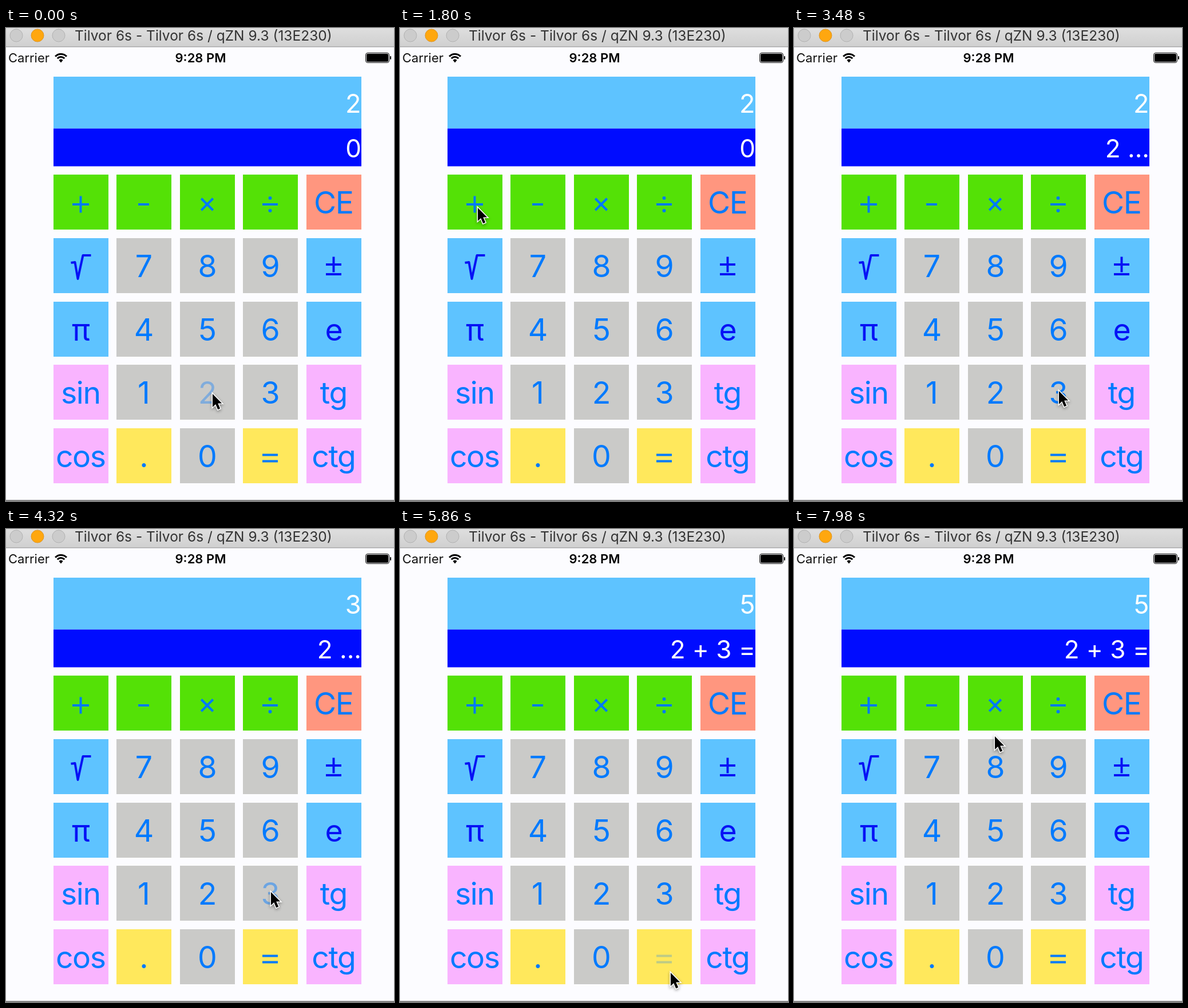
Write an HTML page with a canvas that moves like this. It is 678 px wide and 826 px high and loops after 8000 ms.

```html
<!DOCTYPE html>
<html lang="en">
<head>
<meta charset="utf-8">
<title>Calculator</title>
<style>
html, body { margin: 0; width: 100%; height: 100%; overflow: hidden; background: #fcfcff; }
canvas { display: block; width: 678px; height: 826px; }
</style>
</head>
<body>
<canvas id="stage" width="678" height="826"></canvas>
<script>
const ctx = document.getElementById('stage').getContext('2d');
const LOOP = 8000, HOLD = 160, FADE = 480;
const KEY = 96, STEP_X = 110.5, STEP_Y = 110.75;
const BLUE = '#007aff', DEEP = '#0712f5', SKY = '#5ec3ff';
const GREEN = '#54e106', GRAY = '#cacac8', PINK = '#f9b4ff', YELLOW = '#ffe85c', CORAL = '#ff967f';
const FACE = 'Inter, Roboto, sans-serif';

const rows = ['+ - × ÷ CE', '√ 7 8 9 ±', 'π 4 5 6 e', 'sin 1 2 3 tg', 'cos . 0 = ctg']
  .map(row => row.split(' '));

// Release time of each tapped key
const released = { '2': -140, '+': 2350, '3': 4135, '=': 5780 };

// Cursor moves; a bend above 1 makes the vertical part run ahead
const rest = { x: 361, y: 638 };
const moves = [
  { at: 130, time: 1080, x: 136, y: 313, bend: 4.7 },
  { at: 2420, time: 540, x: 463, y: 633, bend: 1.5 },
  { at: 4550, time: 700, x: 473, y: 774, bend: 1 },
  { at: 6100, time: 855, x: 351, y: 361, bend: 0.9 }
];

const clamp = p => Math.max(0, Math.min(1, p));
const ease = p => p * p * (3 - 2 * p);
const mix = (a, b, p) => a + (b - a) * p;

function rect(x, y, w, h, color) {
  ctx.fillStyle = color;
  ctx.fillRect(x, y, w, h);
}

function roundRect(x, y, w, h, r) {
  ctx.beginPath();
  ctx.roundRect(x, y, w, h, r);
}

function text(str, x, y, size, color, align = 'left', spacing = 0, weight = 400) {
  ctx.font = `${weight} ${size}px ${FACE}`;
  ctx.letterSpacing = spacing + 'px';
  ctx.textAlign = align;
  ctx.fillStyle = color;
  ctx.fillText(str, x, y);
}

function disc(x, y, r, color, edge) {
  ctx.beginPath();
  ctx.arc(x, y, r, 0, Math.PI * 2);
  ctx.fillStyle = color;
  ctx.fill();
  if (edge) {
    ctx.strokeStyle = edge;
    ctx.lineWidth = 1;
    ctx.stroke();
  }
}

function polyline(...points) {
  ctx.beginPath();
  for (const [x, y] of points) ctx.lineTo(x, y);
}

function titleBar() {
  const shade = ctx.createLinearGradient(0, 0, 0, 32);
  shade.addColorStop(0, '#dedede');
  shade.addColorStop(1, '#d0d0d0');
  rect(0, 0, 678, 32, shade);
  rect(0, 32, 678, 1.5, '#aaaaaa');
  disc(18, 13, 11, '#cccccc', '#b2b2b2');
  disc(55, 13, 11, '#ffa70f', '#dd9526');
  disc(92, 13, 11, '#cccccc', '#b2b2b2');
  text('Tilvor 6s - Tilvor 6s / qZN 9.3 (13E230)', 120, 22, 24.5, '#333');
}

function wifi() {
  ctx.strokeStyle = ctx.fillStyle = '#000';
  ctx.lineWidth = 3;
  for (const r of [8.5, 13.5]) {
    ctx.beginPath();
    ctx.arc(96, 59, r, -Math.PI * 0.76, -Math.PI * 0.24);
    ctx.stroke();
  }
  ctx.beginPath();
  ctx.moveTo(96, 60.5);
  ctx.arc(96, 59, 4.5, -Math.PI * 0.78, -Math.PI * 0.22);
  ctx.fill();
}

function battery() {
  ctx.strokeStyle = ctx.fillStyle = '#000';
  ctx.lineWidth = 1;
  roundRect(628.5, 43.5, 41, 17, 3.5);
  ctx.stroke();
  roundRect(630, 45, 38, 14, 2);
  ctx.fill();
  roundRect(671, 49, 2, 6, 1);
  ctx.fill();
}

function statusBar() {
  text('Carrier', 4, 60, 22, '#111');
  text('9:28 PM', 340, 60, 22, '#000', 'center', 0, 600);
  wifi();
  battery();
}

function display(t) {
  const done = key => t >= released[key];
  const value = done('=') ? '5' : done('3') ? '3' : '2';
  const history = done('=') ? '2 + 3 =' : done('+') ? '2 ...' : '0';
  rect(83, 85, 538, 90.5, SKY);
  rect(83, 175.5, 538, 66, '#000cff');
  text(value, 620.5, 148, 45, '#fff', 'right');
  text(history, 621, 225.5, 44, '#fff', 'right');
}

// Bar centred at the origin, moved down by dy
const bar = (w, h, dy = 0) => ctx.fillRect(-w / 2, dy - h / 2, w, h);

function plus(size, dy = 0) {
  bar(size, 4, dy);
  bar(4, size, dy);
}

const signs = {
  '+': () => plus(29),
  '-': () => bar(19, 4),
  '×': () => { ctx.rotate(Math.PI / 4); plus(29); },
  '÷': () => { bar(27, 4); for (const y of [-11, 11]) disc(0, y, 3, BLUE); },
  '=': () => { for (const y of [-5.5, 5.5]) bar(27, 4, y); },
  '±': () => { plus(27, -6); bar(27, 4, 11); },
  '√': () => {
    ctx.lineJoin = 'round';
    polyline([-17, -9], [-10, -10], [-5, 19], [4, -22], [18, -22]);
    ctx.stroke();
  }
};

function drawLabel(label, cx, cy) {
  const color = '√πe±'.includes(label) ? DEEP : BLUE;
  if (!signs[label]) {
    const spacing = label.length > 1 ? -1.4 : 0;
    text(label, cx + spacing / 2, cy + 20, 53.5, color, 'center', spacing);
    return;
  }
  ctx.save();
  ctx.translate(cx - 0.5, cy + 4);
  ctx.fillStyle = ctx.strokeStyle = color;
  ctx.lineWidth = 4;
  signs[label]();
  ctx.restore();
}

function keyColor(label, col, row) {
  if (label === 'CE') return CORAL;
  if (row === 0) return GREEN;
  if (label === '.' || label === '=') return YELLOW;
  if (col > 0 && col < 4) return GRAY;
  return row < 3 ? SKY : PINK;
}

function labelAlpha(label, t) {
  const since = t - released[label];
  if (!(since >= -HOLD)) return 1;
  return mix(0.2, 1, ease(clamp(since / FADE)));
}

function keypad(t) {
  rows.forEach((labels, row) => labels.forEach((label, col) => {
    const x = Math.floor(83 + col * STEP_X), y = Math.round(256 + row * STEP_Y);
    rect(x, y, KEY, KEY, keyColor(label, col, row));
    ctx.globalAlpha = labelAlpha(label, t);
    drawLabel(label, x + KEY / 2, y + KEY / 2);
    ctx.globalAlpha = 1;
  }));
}

function cursorAt(t) {
  return moves.reduce((from, to) => {
    const p = ease(clamp((t - to.at) / to.time));
    const lead = 1 - (1 - p) ** to.bend;
    return { x: mix(from.x, to.x, p), y: mix(from.y, to.y, lead) };
  }, rest);
}

function cursor(t) {
  const { x, y } = cursorAt(t);
  ctx.save();
  ctx.translate(x, y + 1);
  ctx.scale(0.88, 0.88);
  polyline([0, 0], [0, 26], [6, 20.5], [10.5, 31], [15, 29], [10.5, 18.8], [18.5, 18.8]);
  ctx.closePath();
  ctx.lineWidth = 3.4;
  ctx.strokeStyle = '#fff';
  ctx.shadowColor = 'rgba(0,0,0,.4)';
  ctx.shadowBlur = 5;
  ctx.shadowOffsetY = 2;
  ctx.stroke();
  ctx.shadowColor = 'transparent';
  ctx.fillStyle = '#000';
  ctx.fill();
  ctx.restore();
}

function draw(t) {
  rect(0, 0, 678, 826, '#fcfcff');
  titleBar();
  statusBar();
  display(t);
  keypad(t);
  rect(0, 824, 678, 2, '#858585');
  cursor(t);
}

const start = performance.now();
function tick() {
  draw((performance.now() - start) % LOOP);
  requestAnimationFrame(tick);
}
tick();
</script>
</body>
</html>
```
